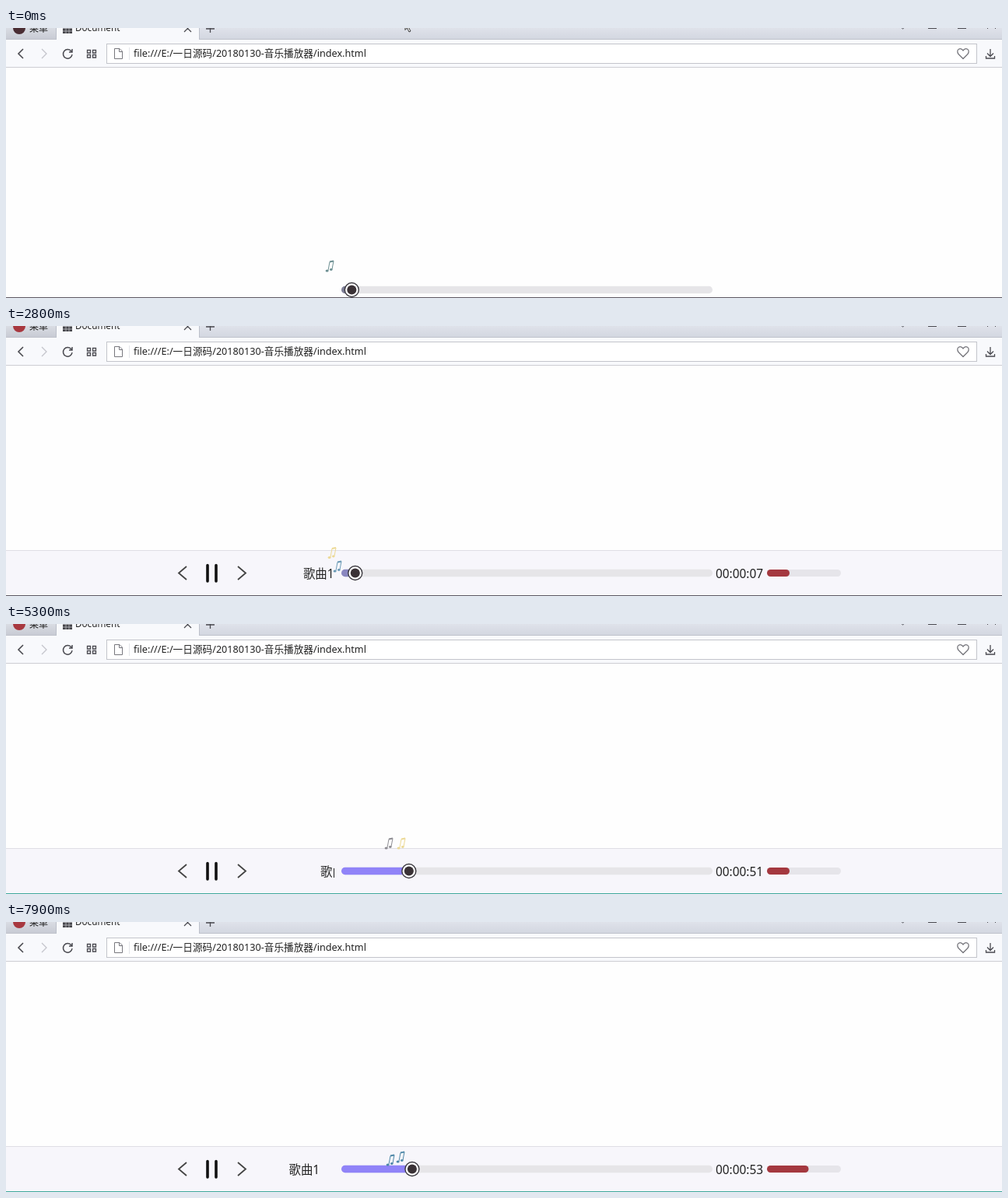
Write an HTML page that moves like this. It is 1280 px wide and 347 px high and loops after 8000 ms.

```html
<!DOCTYPE html>
<html lang="zh-CN">
<head>
<meta charset="utf-8">
<title>Music player</title>
<style>
  html, body { margin: 0; width: 100%; height: 100%; overflow: hidden; background: #fefefe; }
  svg { display: block; width: 1280px; height: 347px; }
  text { font-family: "Noto Sans", "Noto Sans CJK SC", sans-serif; fill: #222; white-space: pre; }
  .icon { fill: none; stroke: #4a4a50; stroke-width: 1.3; }
</style>
</head>
<body>
<svg viewBox="0 0 1280 347">
  <defs>
    <linearGradient id="tabs" x2="0" y2="1">
      <stop stop-color="#dfe2ea"/><stop offset="1" stop-color="#d2d6e0"/>
    </linearGradient>
    <linearGradient id="menu" x2="0" y2="1">
      <stop stop-color="#d9dce3"/><stop offset="1" stop-color="#c7cad3"/>
    </linearGradient>
    <clipPath id="titleBox"><rect x="322" y="290" width="100" height="60"/></clipPath>
    <g id="note" fill="none" stroke="currentColor">
      <path d="M-2 5 0-6M3 3.5 5-7" stroke-width="1"/>
      <path d="M0-6 5-7" stroke-width="1.8"/>
      <g fill="currentColor" stroke="none">
        <ellipse cx="-3.4" cy="5.6" rx="2" ry="1.5"/><ellipse cx="1.8" cy="4" rx="1.8" ry="1.4"/>
      </g>
    </g>
  </defs>
  <rect width="1280" height="347" fill="#fefefe"/>

  <!-- browser window -->
  <rect width="1280" height="15" fill="url(#tabs)"/>
  <rect width="64" height="15" fill="url(#menu)"/>
  <path d="M0 14.5H1280" stroke="#bfc2cb"/>
  <rect y="15" width="1280" height="36" fill="#f8f9fc"/>
  <rect x="65" width="183" height="16" fill="#f8f9fc"/>
  <path d="M64.5 0V15M248.5 0V15" stroke="#bcc0ca"/>
  <path d="M0 50.5H1280" stroke="#cdced3"/>
  <circle id="badge" cx="17" r="8"/>
  <text x="30" y="4.5" font-size="12">菜单</text>
  <rect x="73" y="-5" width="12" height="12" fill="#45454a"/>
  <path d="M73 .5H85M73 4H85M77 0V7M81 0V7" stroke="#c9c9ce" stroke-width=".7"/>
  <text x="89" y="4" font-size="11.7">Document</text>
  <g class="icon">
    <path d="M229-4 238 5M238-4 229 5M257 1H268M262.5-4V6"/>
    <path d="M1150-1 1152.500 1 1155-1M1185 .5H1196M1223 .5H1234M1261 1 1263-1M1270-1 1272 1" stroke-width="1"/>
    <path d="M22 27 16 33 22 39" stroke-width="1.600"/>
    <path d="M46 27 52 33 46 39" stroke="#c4c5cc"/>
    <path d="M84 30A5.800 5.800 0 1 0 85 34M85 27V31H81" stroke-width="1.500"/>
    <path d="M104.500 28.500h4v3.500h-4zM111.500 28.500h4v3.500h-4zM104.500 34.500h4v3.500h-4zM111.500 34.500h4v3.500h-4z"/>
  </g>
  <rect x="129.500" y="20.500" width="1118" height="25" fill="#fff" stroke="#c3c5cb"/>
  <g class="icon">
    <path d="M139.500 26.500H146L149.500 30V39.500H139.500ZM145.500 26.500V30.500H149.500" stroke="#77777d" stroke-width="1"/>
    <path d="M158.500 25V41" stroke="#e4e5e9" stroke-width="1"/>
    <path d="M1230 39.500 1224 33.500C1220 28 1227 24 1230 29 1233 24 1240 28 1236 33.500Z" stroke="#77777d"/>
    <path d="M1265 27V36M1261 32.500 1265 36.500 1269 32.500M1259.500 36V39H1270.500V36"/>
  </g>
  <text x="164" y="37.300" font-size="12.650">file:///E:/一日源码/20180130-音乐播放器/index.html</text>
  <path id="cursor" d="M513-10V2.500L515.500 0 518 5 520 4 517.500-.5H521Z" fill="#fff" stroke="#333"/>

  <!-- player -->
  <g id="panel">
    <rect y="288" width="1280" height="60" fill="#f7f6fb"/>
    <path d="M0 288.500H1280" stroke="#dfdee5"/>
    <path d="M232 309 222 317.500 232 326M298 309 308 317.500 298 326" fill="none" stroke="#444" stroke-width="1.800"/>
    <path d="M259 307.500V328M270 307.500V328" stroke="#111" stroke-width="3.600" stroke-linecap="round"/>
    <g clip-path="url(#titleBox)"><text id="title" y="324" font-size="15.400">歌曲1</text></g>
    <text id="clock" x="912" y="323.500" font-size="15.400"></text>
    <rect x="978" y="313" width="95" height="9" rx="4.500" fill="#e6e5ea"/>
    <rect id="volume" x="978" y="313" height="9" rx="4.500" fill="#a4383f"/>
  </g>
  <g id="bar">
    <rect x="431" y="-4.700" width="477" height="9.400" rx="4.700" fill="#e6e5e8"/>
    <rect id="fill" x="431" y="-4.700" height="9.400" rx="4.700"/>
    <g id="knob">
      <circle r="9" fill="#fff" stroke="#3c3a40" stroke-width="1.400"/>
      <circle r="6" fill="#3a3236"/>
    </g>
    <g id="notes"></g>
  </g>
  <path id="edge" d="M0 346.500H1280"/>
</svg>
<script>
const LOOP = 8000, STEP = 100, SEEK = 3400, LIFE = 700;
const $ = id => document.getElementById(id);
const set = (el, attrs) => { for (const k in attrs) el.setAttribute(k, attrs[k]); };
const clamp = v => Math.max(0, Math.min(1, v));

// cubic-bezier(.25, .1, .25, 1)
function ease(x) {
  const curve = (a, b, u) => 3 * a * u * (1 - u) ** 2 + 3 * b * u * u * (1 - u) + u ** 3;
  let lo = 0, hi = 1;
  for (let i = 0; i < 24; i++) {
    const mid = (lo + hi) / 2;
    if (curve(.25, .25, mid) < x) lo = mid; else hi = mid;
  }
  return curve(.1, 1, lo);
}

const blue = '#4f88a8', teal = '#6c8f92', gray = '#8d8c92', yellow = '#ecd995', pale = '#cbb9c0';
// birth time, x, colour
const notes = [
  [-540, 416, teal], [0, 428, yellow], [350, 418, gray], [800, 416, blue], [1080, 431, yellow],
  [1400, 416, blue], [1740, 420, pale], [2050, 430, gray], [2350, 419, yellow], [2700, 426, blue],
  [3380, 421, blue], [3550, 492, gray], [3850, 504, teal], [4200, 496, yellow],
  [4660, 492, gray], [4660, 508, yellow], [5350, 498, blue], [5700, 506, gray],
  [6380, 508, pale], [6550, 495, teal], [6900, 507, yellow], [7150, 497, blue],
  [7660, 507, blue], [7740, 494, blue]
].map(([birth, x, color]) => {
  const el = document.createElementNS('http://www.w3.org/2000/svg', 'use');
  set(el, { href: '#note', color });
  $('notes').append(el);
  return { birth, x, el };
});

function draw(t) {
  const rise = ease(clamp((t - 1315) / 800));
  set($('panel'), { transform: `translate(0 ${58 * (1 - rise)})` });
  set($('bar'), { transform: `translate(0 ${317.5 + 19 * (1 - rise)})` });

  const seconds = t / 1000 + (t < SEEK ? 4.6 : 45.9);
  const x = 515 + (seconds - 49.4) * 1.577;
  $('clock').textContent = '00:00:' + String(Math.floor(seconds)).padStart(2, '0');
  set($('knob'), { transform: `translate(${x} 0)` });
  set($('fill'), { width: x - 431, fill: t < 1100 ? '#7d7e96' : t < SEEK ? '#8a87c0' : '#9083f8' });
  set($('volume'), { width: t < 7200 ? 29 : 53.5 });

  const phase = ((t - 300 + 5900) % 5900) / 5900;
  set($('title'), { x: 323.5 + 81.7 * ease(phase) });

  for (const { birth, x, el } of notes) {
    const age = t - birth;
    const alpha = clamp(Math.min(age / 120, (LIFE - age) / 60));
    set(el, { opacity: alpha, transform: `translate(${x} ${-3 - age * .05})` });
  }

  set($('badge'), { fill: t < 1500 ? '#4a2d33' : '#a8383f' });
  set($('edge'), { stroke: t < 2900 ? '#5c5862' : '#3fa99b' });
  set($('cursor'), { visibility: t < 200 ? 'visible' : 'hidden' });
}

const start = performance.now();
function tick() {
  const t = (performance.now() - start) % LOOP;
  draw(Math.floor(t / STEP) * STEP);
  requestAnimationFrame(tick);
}
tick();
</script>
</body>
</html>
```
